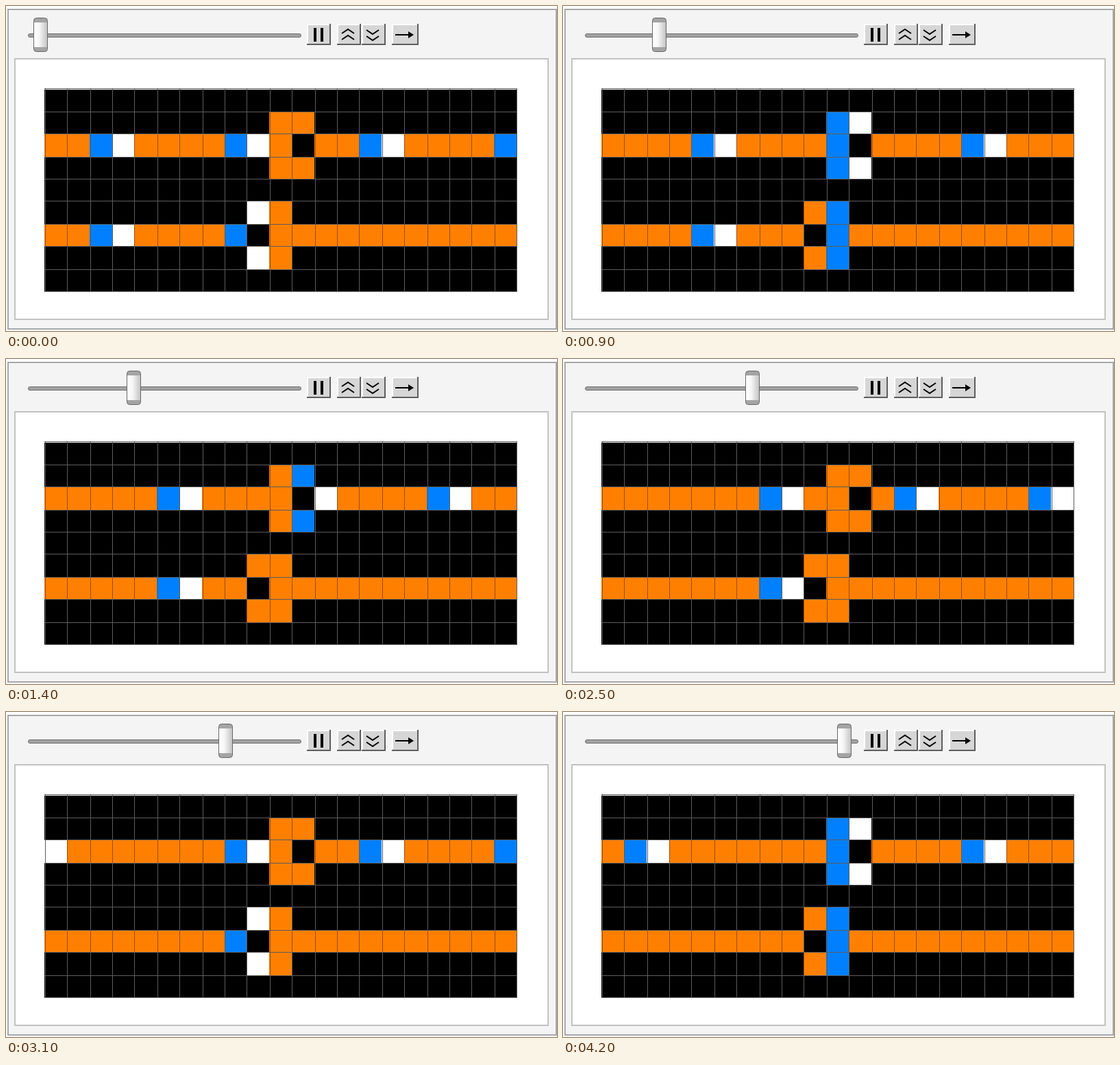
These frames come from a looping animation (804x474 px, 4500 ms). An HTML page:

```html
<!DOCTYPE html>
<html lang="en">
<head>
<meta charset="utf-8">
<title>Wireworld diodes</title>
<style>
  html, body { margin: 0; width: 100%; height: 100%; overflow: hidden; background: #fff; }
  svg { display: block; }
</style>
</head>
<body>
<svg id="stage" width="804" height="474" viewBox="0 0 804 474">
  <defs>
    <linearGradient id="metal">
      <stop offset="0" stop-color="#fff"/>
      <stop offset=".4" stop-color="#f6f6f6"/>
      <stop offset="1" stop-color="#c4c4c4"/>
    </linearGradient>
  </defs>
  <rect x="3" y="5" width="800" height="466" fill="#f4f4f4" stroke="#a8a8a8" stroke-width="2"/>
  <rect x="13" y="77" width="778" height="380" fill="#fff" stroke="#c2c2c2" stroke-width="2"/>
  <rect x="32.5" y="40.5" width="398" height="5" rx="2.5" fill="#a2a2a2" stroke="#707070"/>
  <g id="thumb">
    <rect x=".5" y="17.5" width="20" height="49" rx="4" fill="#a4a4a4"/>
    <rect x="1" y="24" width="19" height="36" fill="url(#metal)"/>
    <rect x=".5" y="17.5" width="20" height="49" rx="4" fill="none" stroke="#686868"/>
  </g>
  <g id="buttons"></g>
  <g fill="none" stroke="#000" stroke-width="2">
    <path d="M451 32v20M461 32v20" stroke-width="4"/>
    <path d="M490 40l9-6 9 6M490 49l9-6 9 6"/>
    <path d="M526 35l9 6 9-6M526 44l9 6 9-6"/>
    <path d="M568 42h22"/>
    <path d="M587 37l8 5-8 5z" fill="#000" stroke="none"/>
  </g>
  <g id="cells" shape-rendering="crispEdges"></g>
  <g id="mesh" shape-rendering="crispEdges"></g>
  <g id="seams" shape-rendering="crispEdges"></g>
</svg>
<script>
const COLS = 21, ROWS = 9, PITCH = 32.8;
const DURATIONS = [300, 600, 500, 600, 500, 600, 500, 600, 300];
const LOOP = DURATIONS.reduce((a, b) => a + b);
const COLORS = { '.': '#000', w: '#ff8000', t: '#0080ff', h: '#fff' };
const MESH = '#5c5c5c', WIRE_SEAM = '#9c4c08';

// . empty, w wire, t electron tail, h electron head
const START = [
  '',
  '..........ww',
  'wwthwwwwthw.wwthwwwwt',
  '..........ww',
  '',
  '.........hw',
  'wwthwwwwt.wwwwwwwwwww',
  '.........hw',
  ''
].map(row => [...row.padEnd(COLS, '.')]);

const byId = id => document.getElementById(id);
const cellLeft = c => Math.floor(56.7 + PITCH * c);
const meshX = c => cellLeft(c) | 1;
const meshY = r => 416 - 2 * Math.round(16.39 * (ROWS - r));

function rect(parent, x, y, width, height, fill) {
  const el = document.createElementNS('http://www.w3.org/2000/svg', 'rect');
  const attrs = { x, y, width, height, fill };
  for (const name in attrs) el.setAttribute(name, attrs[name]);
  parent.append(el);
  return el;
}

function button(x, width) {
  const g = byId('buttons');
  rect(g, x, 26, width, 31, '#5e5e5e');
  rect(g, x, 26, width - 2, 29, '#fff');
  rect(g, x + 2, 28, width - 4, 27, '#d6d6d6');
}

function countHeads(grid, r, c) {
  let n = 0;
  for (let dr = -1; dr <= 1; dr++)
    for (let dc = -1; dc <= 1; dc++)
      if (grid[(r + dr + ROWS) % ROWS][(c + dc + COLS) % COLS] === 'h') n++;
  return n;
}

function evolve(grid) {
  return grid.map((row, r) => row.map((state, c) => {
    if (state === 'h') return 't';
    if (state === 't') return 'w';
    if (state === '.') return '.';
    const n = countHeads(grid, r, c);
    return n === 1 || n === 2 ? 'h' : 'w';
  }));
}

[[439, 35], [483, 35], [519, 35], [563, 39]].forEach(b => button(...b));

const left = cellLeft(0), right = meshX(COLS), top0 = meshY(0), bottom = meshY(ROWS);
rect(byId('cells'), left, top0 + 2, right - left, bottom - top0 - 2, '#000');

const wires = [];
START.forEach((row, r) => row.forEach((state, c) => {
  if (state === '.') return;
  const x = cellLeft(c), y = meshY(r), height = meshY(r + 1) - y;
  wires.push({
    r, c,
    body: rect(byId('cells'), x, y, cellLeft(c + 1) - x, height),
    seam: rect(byId('seams'), meshX(c), y + 1, 1, height - 1)
  });
}));

for (let c = 0; c <= COLS; c++) rect(byId('mesh'), meshX(c), top0, 1, bottom - top0 + 1, MESH);
for (let r = 0; r <= ROWS; r++) rect(byId('mesh'), left, meshY(r), right - left + 1, 1, MESH);

const generations = [START];
while (generations.length < DURATIONS.length) generations.push(evolve(generations.at(-1)));

let shown = -1;
function render(time) {
  let rest = time % LOOP, step = 0;
  while (rest >= DURATIONS[step]) rest -= DURATIONS[step++];
  if (step === shown) return;
  shown = step;
  for (const { r, c, body, seam } of wires) {
    const state = generations[step][r][c];
    body.setAttribute('fill', COLORS[state]);
    seam.setAttribute('fill', state === 'w' ? WIRE_SEAM : MESH);
  }
  byId('thumb').setAttribute('transform', `translate(${2 * Math.round(20 + 22.5 * step)} 0)`);
}

const begin = performance.now();
function tick() {
  render(performance.now() - begin);
  requestAnimationFrame(tick);
}
tick();
</script>
</body>
</html>
```
